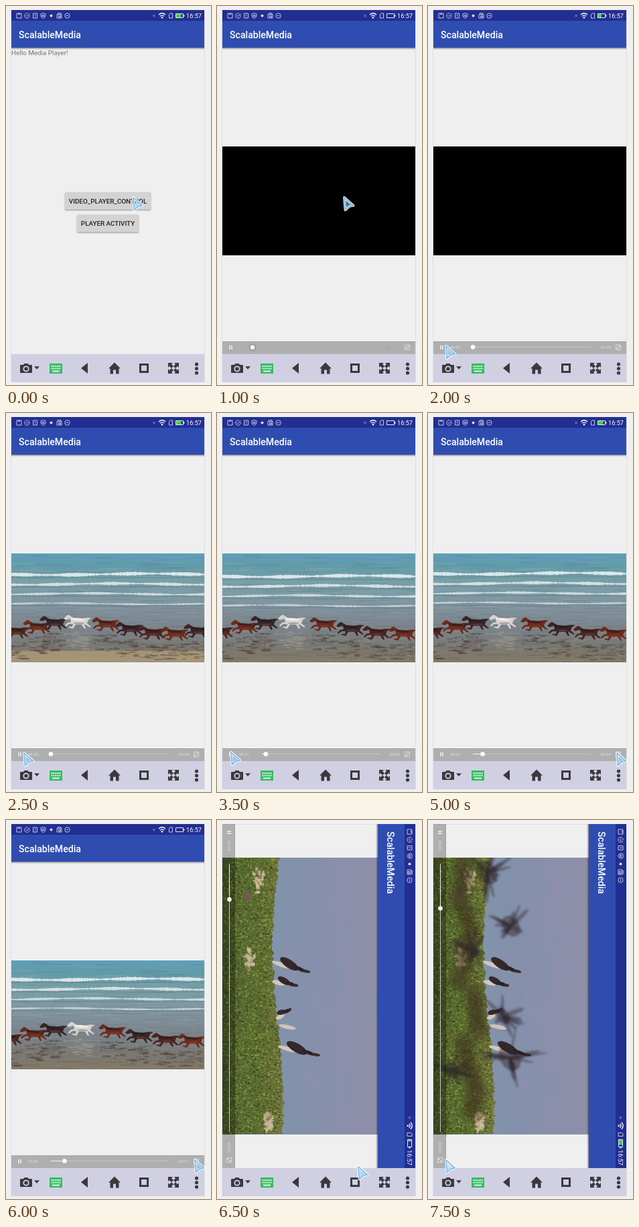
An HTML page with a canvas that plays this animation: 306x564 px, repeating every 8000 ms.

```html
<!DOCTYPE html>
<html lang="en">
<head>
<meta charset="utf-8">
<title>Media player demo</title>
<style>
html, body { margin: 0; width: 306px; height: 564px; overflow: hidden; background: #f0f0f0; }
canvas { display: block; }
</style>
</head>
<body>
<canvas id="stage" width="306" height="564"></canvas>
<script>
const g = document.getElementById('stage').getContext('2d');
const STEP = 500, STEPS = 16;
// Pointer rests: from step, x, y
const RESTS = [[0, 189, 284], [3, 54, 499], [4, 26, 505], [6, 20, 504], [9, 281, 505], [13, 210, 515],
  [14, 110, 542], [15, 26, 505]];

let seed;
function rnd(a = 0, b = 1) {
  seed = (seed * 16807) % 2147483647;
  return a + (b - a) * seed / 2147483647;
}
function rect(x, y, w, h, color) {
  g.fillStyle = color;
  g.fillRect(x, y, w, h);
}
function text(str, x, y, font, color, align = 'left') {
  g.font = font + ' Roboto, sans-serif';
  g.fillStyle = color;
  g.textAlign = align;
  g.fillText(str, x, y);
}
function shape(d, x, y, fill, stroke, width = 1) {
  const p = new Path2D(d);
  g.save();
  g.translate(x, y);
  g.lineWidth = width;
  if (fill) { g.fillStyle = fill; g.fill(p, 'evenodd'); }
  if (stroke) { g.strokeStyle = stroke; g.stroke(p); }
  g.restore();
}
function oval(x, y, rx, ry, color, angle = 0) {
  g.fillStyle = color;
  g.beginPath();
  g.ellipse(x, y, rx, ry, angle, 0, 7);
  g.fill();
}
const disc = (x, y, r, color) => oval(x, y, r, r, color);
function gradient(x1, y1, x2, y2, ...colors) {
  const s = g.createLinearGradient(x1, y1, x2, y2);
  colors.forEach((c, i) => s.addColorStop(i / (colors.length - 1), c));
  return s;
}
function scene(x, y, w, h, fill) {
  g.save();
  g.beginPath();
  g.rect(x, y, w, h);
  g.clip();
  rect(x, y, w, h, fill);
}

const HORSE = 'M-21-5L-17-9L-14-11Q-9-8-6-6Q4-4 10-6Q15-7 21-6L16-3L14 2L20 7L18 8L10 3L12 10L10 10L6 4' +
  'L-3 4L-7 10L-14 8L-13 7L-8 7L-7 3L-13 3L-18 7L-19 5L-15 1L-10 0L-11-5L-18-3Z';

function horse(i, spread) {
  const white = i == 3, coat = white ? '#d6d2cc' : ['#4a2420', '#6a2a1d', '#38242a'][i % 3];
  const x = 14 + 34 * i - 13 * Math.exp(-((i - 2.4) ** 2)) + spread * (5 * i - 10);
  const y = 320 - 9 * Math.cos((i - 2.8) * .8);
  for (let k = 0; k < 26; k++) {
    const down = rnd(14, 40);
    rect(x + rnd(-20, 12), y + down, rnd(4, 14), rnd(1, 3), white ? '#b9b09a44' : '#3b2a2444');
  }
  shape(HORSE, x, y, coat);
  oval(x, y - 4, 11, 2, white ? '#efebe5' : '#2216188c', .08);
  oval(x + 2, y + 2, 8, 1.5, white ? '#a9a29c' : '#8c4a3070');
}

function beach(s) {
  const swell = 3 * Math.sin((s - 5) * .7), spread = Math.min(1, (s - 5) / 2);
  scene(8, 209, 288, 162, gradient(0, 209, 0, 371, '#5f9fb8', '#629aa8', '#789fa8', '#7c9aa5', '#80929c',
    '#7b878f', '#7c8083', '#7b776e', '#857966'));
  seed = 77;
  for (let i = 0; i < 260; i++) {
    const y = rnd(212, 371);
    rect(rnd(0, 290), y, rnd(15, 60), 1, i % 2 ? '#b7c9cd22' : '#3c53582a');
  }
  for (let i = 0; i < 4; i++) {
    const y = 240 + 14.6 * i + swell, h = 6 - i;
    g.fillStyle = `rgba(226,235,236,${.95 - .08 * i})`;
    for (let x = 8; x < 296; x += 2) {
      const t = h * (.65 + .25 * Math.sin(x / 13 + i * 2) + rnd(-.15, .15));
      g.fillRect(x, y - t / 2 + Math.sin(x / 45 + i), 2, t);
    }
    rect(8, y + h / 2 + 1, 288, 1.5, '#4f717855');
  }
  rect(8, 354, 288, 17, `rgba(168,151,122,${.9 * (1 - spread)})`);
  for (let i = 0; i < 9; i++) horse(i, spread);
  g.restore();
}

// A perched bird, feet at x1,y1 and beak at x2,y2
function bird(x1, y1, x2, y2) {
  g.save();
  g.translate(x1, y1);
  g.rotate(Math.atan2(y2 - y1, x2 - x1));
  const n = Math.hypot(x2 - x1, y2 - y1);
  oval(n * .24, 3, n * .26, 3.2, '#d3c8b8');
  oval(n * .42, -2, n * .27, n * .08 + 1.5, '#34282a', .25);
  oval(n * .72, 0, n * .17, 2.8, '#2c2225', .1);
  oval(n * .9, 0, n * .1, 2.2, '#3a2c2c', -.1);
  g.restore();
}

// Blurred wing beats radiating from one point
function flutter(x, y, size) {
  for (let i = 0; i < 13; i++) {
    const a = rnd(0, 6.3), n = size * rnd(.3, 1);
    oval(x + Math.cos(a) * n / 2, y + Math.sin(a) * n / 2, n / 2, rnd(1.5, 4), '#2f252a66', a);
  }
  oval(x, y, size * .35, size * .25, '#2f252a77', 1);
}

function meadow(flight) {
  const edge = y => 91 - 8 * Math.sin((y - 70) / 75);
  scene(8, 56, 232, 412, gradient(85, 0, 240, 0, '#8193ab', '#8490ab', '#8b8fab', '#8f8ea8'));
  seed = 4321;
  for (let i = 0; i < 40; i++)
    rect(rnd(95, 225), rnd(56, 430), rnd(8, 22), rnd(15, 60), i % 2 ? '#7d93a733' : '#958ead26');
  g.save();
  g.beginPath();
  g.moveTo(8, 56);
  for (let y = 56; y <= 468; y += 3) g.lineTo(edge(y) + rnd(-2, 2), y);
  g.lineTo(8, 468);
  g.fillStyle = gradient(8, 0, 98, 0, '#4b5a27', '#566a30', '#5a6c30', '#6f7440');
  g.fill();
  g.clip();
  for (let i = 0; i < 6500; i++) {
    const x = rnd(8, 102);
    rect(x, rnd(56, 468), rnd(1, 3), rnd(1, 2),
      `hsl(${rnd(62, 95) - x / 8},${rnd(28, 48)}%,${rnd(14, 44) + x / 20}%)`);
  }
  for (const [x, y, size] of [[62, 90, 22], [49, 206, 17], [77, 450, 15]])
    for (let i = 0; i < 60; i++) {
      const a = rnd(0, 6.3), n = size * rnd();
      oval(x + Math.cos(a) * n * .45, y + Math.sin(a) * n, rnd(1, 3), rnd(1, 4), i % 3 ? '#d3c2a2aa' : '#84704caa');
    }
  oval(45, 113, 7, 8, '#6a6047');
  if (flight) {
    g.filter = 'blur(5px)';
    for (let y = 70; y < 440; y += 24) oval(edge(y) - rnd(15, 40), y, 14, 18, `rgba(62,48,30,${.55 * flight})`);
    g.filter = 'none';
  }
  g.restore();
  bird(84, 208, 139, 227);
  bird(84, 237, 121, 247);
  bird(87, 293, 111, 281);
  bird(93, 334, 154, 351);
  oval(105, 308, 13, 3, '#cfc4b6', .2);
  if (flight) {
    g.globalAlpha = flight;
    g.filter = 'blur(1.5px)';
    for (const [x, y, size] of [[88, 78, 55], [124, 158, 48], [66, 194, 36], [112, 292, 36], [122, 354, 58], [36, 372, 38]])
      flutter(x, y, size);
    g.filter = 'none';
    g.globalAlpha = 1;
  }
  g.restore();
}

const ICONS = [
  'M-3.5-3.5H3.5V3.5H-3.5ZM-1-3.5V-2H1V-3.5',
  'M3.5-1A3.7 3.7 0 1 1 1-3.5M-1.5-.5L0 1.2L3.8-3.5',
  'M-3-3.5H3V3.5H-3ZM0-2V1M0 2V2.8',
  'M0-4L3.5-2.8V0Q3.5 2.5 0 4Q-3.5 2.5-3.5 0V-2.8ZM-1.5-1H1.5V1H-1.5Z',
  '',
  'M-3.5-2H3.5V3.5H-3.5ZM-2-2V-3.8H2.5V-2M-1 0H2V2H-1Z',
  'M3.7 0A3.7 3.7 0 1 1-3.7 0A3.7 3.7 0 1 1 3.7 0M-1.8 0H1.8'];

function appBar(W, level) {
  const pale = '#d5d8ec';
  rect(0, 0, W, 16, '#222e91');
  rect(0, 16, W, 40, '#2f4db0');
  rect(0, 56, W, 3, gradient(0, 56, 0, 59, '#00000070', '#00000000'));
  ICONS.forEach((d, i) => d ? shape(d, 11.5 + i * 12, 8.5, null, pale, .9) : disc(11.5 + i * 12, 8.5, 2, pale));
  disc(W - 75, 8.5, 2, '#5663b0');
  shape('M-5-1.5Q0-6 5-1.5M-3 .8Q0-2 3 .8', W - 63, 8.5, null, '#fff', 1.3);
  disc(W - 63, 11.2, 1.3, '#fff');
  shape('M-2.5-2L-1-3.5H2.5V3.5H-2.5Z', W - 50, 8.5, null, pale, .9);
  shape('M.5 .5H11.5V6.5H.5ZM12 2.5H13V4.5H12Z', W - 43, 5, null, '#e4e6f4');
  rect(W - 42, 6, 10 * level, 5, '#41cf52');
  text('16:57', W - 4, 12, '9.2px', '#fff', 'right');
  text('ScalableMedia', 11, 42, '500 14.1px', '#fff');
}

function controls(W, H, s) {
  const y = H - 10, played = Math.max(0, (s - 5) / 2);
  const clock = n => '00:' + String(n).padStart(2, '0');
  rect(0, H - 19, W, 19, 'rgba(0,0,0,.27)');
  rect(0, H - 19, W, 1, 'rgba(0,0,0,.08)');
  rect(10, y - 3, 2, 6, '#e2e2e2');
  rect(13, y - 3, 2, 6, '#e2e2e2');
  shape('M-3.5-3.5H3.5V3.5H-3.5ZM-2 2L2-2M0-2H2V0M-2 0V2H0', W - 12, y, null, '#dedede', .9);
  if (s < 4) {
    disc(45, y, 6, '#a0a0a0');
    disc(45, y, 3.2, '#f4f4f4');
    shape('M-2-2L0 0L-2 2M0-2L2 0L0 2', W - 39, y, null, '#9c9c9c', .8);
    return;
  }
  const a = 59, b = W - 54, x = a + (b - a) * played / 30;
  rect(a, y - 1, b - a, 1, '#c6c8c4');
  rect(a, y - 1, x - a, 1, '#f2f2f2');
  disc(x, y - .5, 3.3, '#fff');
  text(clock(Math.floor(played)), 25, y + 2.3, '6px', '#dfdfdf');
  text('-' + clock(30 - Math.floor(played)), W - 23, y + 2.3, '6px', '#dfdfdf', 'right');
}

function button(str, x, y, w, pressed) {
  g.save();
  g.shadowColor = 'rgba(0,0,0,.4)';
  g.shadowBlur = 2;
  g.shadowOffsetY = 1;
  g.fillStyle = pressed ? '#bababa' : '#d3d3d3';
  g.beginPath();
  g.roundRect(x, y, w, 26, 1.5);
  g.fill();
  g.restore();
  text(str, x + w / 2, y + 16.6, '500 9.85px', '#222', 'center');
}

function toolbar() {
  const ink = '#3a3a3e';
  rect(8, 518, 288, 42, '#d1d0e2');
  shape('M-8-5H-4L-2.5-7H2.5L4-5H8Q9-5 9-4V6Q9 7 8 7H-8Q-9 7-9 6V-4Q-9-5-8-5Z' +
    'M4.6 1A4.6 4.6 0 1 0-4.6 1A4.6 4.6 0 1 0 4.6 1Z', 30, 539, ink);
  disc(30, 540, 2.8, ink);
  shape('M-4-2.3H4L0 2.3Z', 46, 538.5, ink);
  rect(65, 532, 19, 15, '#34bd63');
  for (let i = 0; i < 10; i++) rect(67.5 + i % 5 * 3, i < 5 ? 535 : 538.5, 2, 2, '#e3f3ea');
  rect(69, 542.5, 11, 2, '#e3f3ea');
  shape('M5-8V8L-5 0Z', 117, 539, ink);
  shape('M0-9L9 0H6.5V8H2V2H-2V8H-6.5V0H-9Z', 162, 539.5, ink);
  shape('M-5.5-5.5H5.5V5.5H-5.5Z', 206, 539, null, ink, 3);
  for (let i = 0; i < 4; i++) {
    g.save();
    g.translate(250, 539);
    g.rotate(i * Math.PI / 2);
    shape('M8-8V-1L6-3L3 0L0-3L3-6L1-8Z', 0, 0, ink);
    g.restore();
  }
  [533, 539.5, 546].forEach(y => disc(284.5, y, 2.6, ink));
}

function pointer(s) {
  const [, x, y] = RESTS.findLast(r => r[0] <= s);
  const d = 'M1 1L14.5 13L8.5 14L2.5 19.5Z';
  g.lineJoin = 'round';
  shape(d, x, y, null, '#ffffffdd', 3.8);
  shape(d, x, y, gradient(0, 2, 9, 16, '#e4f2ff66', '#7cc2f288'), '#6db8f0', 1.5);
  g.lineJoin = 'miter';
}

function draw(s) {
  const wide = s > 12, W = wide ? 512 : 288, H = wide ? 288 : 512;
  rect(0, 0, 306, 564, '#f0f0f0');
  rect(8, 6, 288, 512, '#efefef');
  g.lineWidth = 1;
  g.strokeStyle = '#dedede';
  g.strokeRect(7.5, 6.5, 289, 553);
  if (wide) meadow((s - 13) / 2);
  else if (s > 4) beach(s);
  else if (s > 1) rect(8, 209, 288, 162, '#000');

  g.save();
  if (wide) g.transform(0, 1, -1, 0, 296, 6);
  else g.translate(8, 6);
  appBar(W, (s + 3) % 5 / 4);
  if (s > 1) controls(W, H, s);
  else {
    text('Hello Media Player!', 0, 67, '9.9px', '#757575');
    button('VIDEO_PLAYER_CONTROL', 80, 271, 128, s == 1);
    button('PLAYER ACTIVITY', 98, 304.5, 92);
  }
  g.restore();

  toolbar();
  pointer(s);
}

let shown = -1;
function tick() {
  const s = Math.floor(performance.now() / STEP) % STEPS;
  if (s != shown) draw(shown = s);
  requestAnimationFrame(tick);
}
tick();
</script>
</body>
</html>
```
